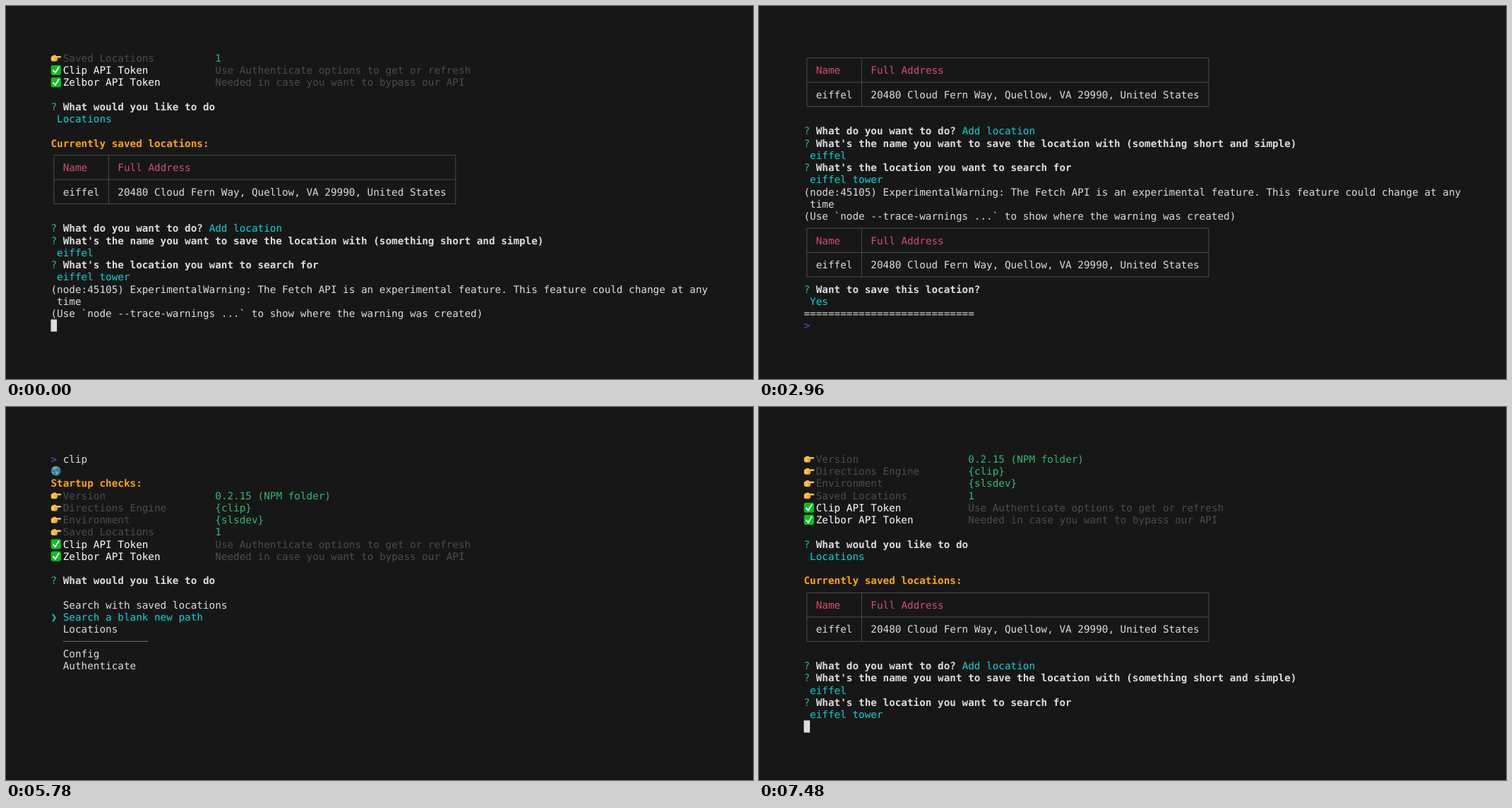
An HTML page that plays this animation: 1058 by 529 pixels, repeating every 7500 ms.

```html
<!DOCTYPE html>
<html lang="en">
<head>
<meta charset="utf-8">
<title>Terminal session</title>
<style>
  html, body { margin: 0; width: 100%; height: 100%; overflow: hidden; background: #171717; }
  svg { display: block; width: 100vw; height: 100vh; }
  text {
    font: 14.32px "DejaVu Sans Mono", monospace;
    fill: #ddd;
    white-space: pre;
    text-rendering: geometricPrecision;
  }
  .bold { font-weight: bold; }
  .white { fill: #fff; }
  .label { fill: #4d4d4d; }
  .hint { fill: #7a7a7a; }
  .green { fill: #31bb71; }
  .cyan { fill: #04d7d7; }
  .red { fill: #d74e6f; }
  .blue { fill: #5a56e0; }
  .orange { fill: #ffa500; font-weight: bold; }
  .cursor { fill: #ddd; }
  .border { stroke: #4d4d4d; fill: none; }
  .rule { stroke: #6f6f6f; }
</style>
</head>
<body>
<svg viewBox="0 0 1058 529">
  <defs>
    <g id="hand">
      <path d="M.3 7.2 Q3 4 6.5 4.6 L8 6 H13.4 Q14.8 6.2 14.8 7.3 T13.4 8.6 H9.3 Q10.4 9.4 9.4 10.4 Q10 11.6 8.8 12.1 Q8.8 13.6 7.2 13.6 H3.6 Q1.8 13.4 .3 12.2Z" fill="#fcc43c"/>
      <path d="M5 8.6 H9.3 M6.2 10.5 H9.4 M6 12.1 H8.8" stroke="#c47a17" stroke-width=".7" fill="none"/>
    </g>
    <g id="check">
      <rect x=".2" y="1.7" width="14.2" height="14" rx="2.4" fill="#08c11c"/>
      <path d="M3.4 9.2 L6.2 12.6 L11.2 4.6" stroke="#fff" stroke-width="2" fill="none" stroke-linecap="round"/>
    </g>
    <g id="earth">
      <circle cx="7.2" cy="8.4" r="7" fill="#2b78c9"/>
      <path d="M2 4.2 Q5 1 9 2.2 L9.4 4 L7 5.6 L6.4 7.6 L4.2 7 L2.4 6.2Z M6.4 8.2 L10 9.2 L11 10.8 L8.8 13.8 L7.6 14.6 L7 11.6Z" fill="#7fae55"/>
      <path d="M10.4 4 L12 5.4 M2 9.6 L4.2 12" stroke="#b9dcf3" stroke-width="1"/>
    </g>
  </defs>
  <g id="screen"></g>
</svg>
<script>
const LOOP = 7500, TICK = 20, ROWS = 23;
const X0 = 63.5, Y0 = 65, CELL = 8.621, ROW = 17.25, BASE = 13.9;
const screen = document.getElementById("screen");

// A line is a list of pieces; each piece draws itself at the top of its row.
const colX = col => X0 + col * CELL;
const put = (col, str, cls = "") => y =>
  `<text x="${colX(col)}" y="${y + BASE}" class="${cls}">${str}</text>`;
const icon = id => y => `<use href="#${id}" x="${X0}" y="${y}"/>`;
const path = (d, cls) => `<path d="${d}" class="${cls}"/>`;
const rule = y => path(`M${colX(2)} ${y + ROW / 2}H${colX(16)}`, "rule");

const edges = [0.5, 9.5, 66.5].map(colX);
const border = (up, down) => y => {
  const mid = y + ROW / 2;
  const sides = edges.map(x => `M${x} ${mid - up * ROW / 2}V${mid + down * ROW / 2}`).join("");
  return path(`M${edges[0]} ${mid}H${edges[2]}` + sides, "border");
};
const sides = y => path(edges.map(x => `M${x} ${y}v${ROW}`).join(""), "border");

const info = (name, value) => [icon("hand"), put(2, name, "label"), put(27, value, "green")];
const token = (name, note) => [icon("check"), put(2, name, "white"), put(27, note, "label")];
const ask = (str, ...rest) => [put(0, "?", "green"), put(2, str, "bold"), ...rest];
const answer = str => [put(1, str, "cyan")];
const prompt = str => [put(0, "&gt;", "blue"), put(2, str)];
const table = [
  [border(0, 1)],
  [sides, put(2, "Name", "red"), put(11, "Full Address", "red")],
  [border(1, 1)],
  [sides, put(2, "eiffel"), put(11, "20480 Cloud Fern Way, Quellow, VA 29990, United States")],
  [border(1, 0)]
];
const options = (names, picked) => names.map((name, i) =>
  !name ? [rule]
  : i === picked ? [put(0, "❯", "cyan"), put(2, name, "cyan")]
  : [put(2, name)]);

const log = [
  prompt("clip"),
  [icon("earth")],
  [put(0, "Startup checks:", "orange")],
  info("Version", "0.2.15 (NPM folder)"),
  info("Directions Engine", "{clip}"),
  info("Environment", "{slsdev}"),
  info("Saved Locations", "1"),
  token("Clip API Token", "Use Authenticate options to get or refresh"),
  token("Zelbor API Token", "Needed in case you want to bypass our API"),
  [],
  ask("What would you like to do"),
  answer("Locations"),
  [],
  [put(0, "Currently saved locations:", "orange")],
  ...table,
  [],
  ask("What do you want to do?", put(26, "Add location", "cyan")),
  ask("What's the name you want to save the location with (something short and simple)"),
  answer("eiffel"),
  ask("What's the location you want to search for"),
  answer("eiffel tower"),
  [put(0, "(node:45105) ExperimentalWarning: The Fetch API is an experimental feature. This feature could change at any")],
  [put(1, "time")],
  [put(0, "(Use `node --trace-warnings ...` to show where the warning was created)")],
  ...table,
  ask("Want to save this location?"),
  answer("Yes"),
  [put(0, "=".repeat(28))],
  prompt("")
];
const hint = "(Use arrow keys)";
const mainMenu = ["Search with saved locations", "Search a blank new path", "Locations", "", "Config", "Authenticate"];
const placeMenu = ["Add location", "Delete Location", "", "Exit"];
const setup = String.raw`set +o history; unset PROMPT_COMMAND; export PS1="\[\e[38;2;90;86;224m\]> \[\e[0m\]"; clear;`;

const typed = (str, start, t) => str.slice(0, Math.max(0, Math.floor((t - start) / 36) + 1));
const blink = (start, t) => Math.floor((t - start) / 391) % 2 === 0;

// View: n finished log lines, extra lines below, cursor as [line, column], least scroll.
const view = (n, cursor, extra = [], top = 0) => ({ lines: log.slice(0, n).concat(extra), cursor, top });
const input = (n, str) => view(n, [n, 1 + str.length], [[put(1, str)]], 2);

function stateAt(t) {
  if (t < 1060) return view(28, blink(-22, t) && [28, 0]);
  if (t < 1080) return view(33, [33, 0]);
  if (t < 1780) {
    const reply = t < 1580 ? "" : "y";
    const on = blink(reply ? 1580 : 1080, t);
    return view(34, on && [34, 7 + reply.length], [[put(1, "(Y/n)", "hint"), put(7, reply)]]);
  }
  if (t < 3760) return view(37, blink(1780, t) && [36, 2]);
  if (t < 3780) return view(0, null, [[put(1, setup)]]);
  if (t < 4120) {
    const cmd = typed("clip", 3792, t);
    return view(0, blink(3900, Math.max(t, 3900)) && [0, 2 + cmd.length], [prompt(cmd)]);
  }
  if (t < 4260) return view(1, [1, 0]);
  if (t < 4280) return view(10, [10, 0]);
  if (t < 6200) {
    const picked = t < 5780 ? 0 : t < 6000 ? 1 : 2;
    const tip = picked ? [] : [put(1, hint, "hint")];
    return view(11, null, [tip, ...options(mainMenu, picked)]);
  }
  if (t < 6220) return view(12, [12, 0]);
  if (t < 6400) {
    const question = ask("What do you want to do?", put(26, hint, "hint"));
    return view(20, null, [question, ...options(placeMenu, 0)]);
  }
  if (t < 6420) return view(21, [21, 0], [], 2);
  if (t < 6800) return input(22, typed("eiffel", 6580, t));
  if (t < 6820) return view(23, [22, 7], [], 2);
  if (t < 7460) return input(24, typed("eiffel", 7020, t) + typed(" tower", 7260, t));
  if (t < 7480) return view(25, [24, 13], [], 2);
  return view(25, [25, 0]);
}

function draw(t) {
  const { lines, cursor, top } = stateAt(t);
  const total = Math.max(lines.length, cursor ? cursor[0] + 1 : 0);
  const first = Math.max(top, total - ROWS);
  const rowY = i => Y0 + (i - first) * ROW;
  let out = lines.map((line, i) => i < first ? "" : line.map(piece => piece(rowY(i))).join("")).join("");
  if (cursor) {
    out += `<rect class="cursor" x="${colX(cursor[1])}" y="${rowY(cursor[0])}" width="${CELL}" height="${ROW}"/>`;
  }
  screen.innerHTML = out;
}

const start = performance.now();
let shown = -1;
function tick() {
  const t = Math.floor((performance.now() - start) % LOOP / TICK) * TICK;
  if (t !== shown) draw(shown = t);
  requestAnimationFrame(tick);
}
tick();
</script>
</body>
</html>
```
